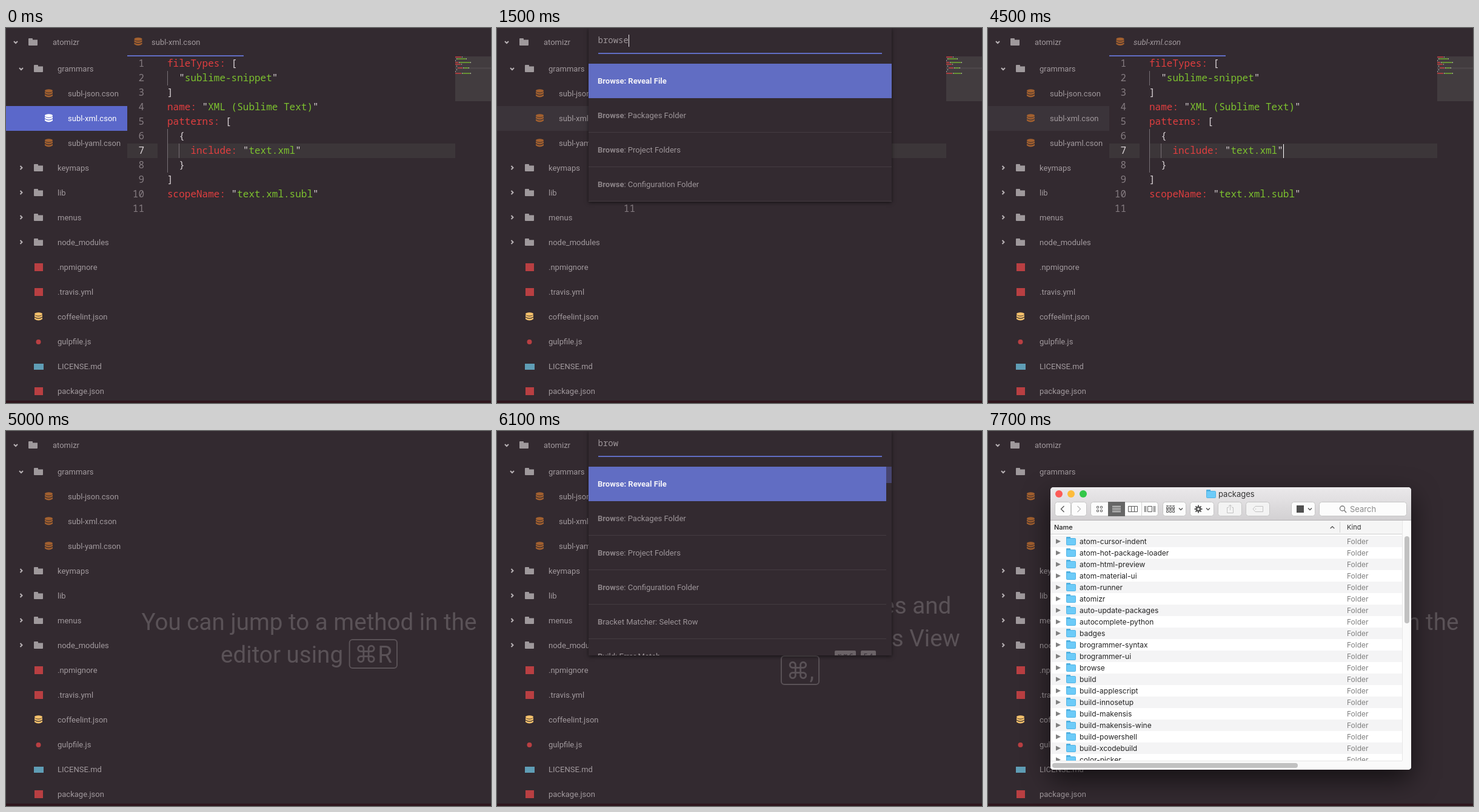
Recreate the animation shown at these times as an HTML page with a canvas. Size 800 by 620 pixels, loop 8 s.

```html
<!DOCTYPE html>
<html lang="en">
<head>
<meta charset="utf-8">
<title>Browse packages</title>
<style>
html, body { margin: 0; width: 100%; height: 100%; overflow: hidden; background: #332a30; }
canvas { display: block; }
</style>
</head>
<body>
<canvas id="stage" width="800" height="620"></canvas>
<script>
const ctx = document.getElementById('stage').getContext('2d');
const LOOP = 8000;
const UI = 'Roboto, "DejaVu Sans", sans-serif';
const MONO = '"Noto Sans Mono", "DejaVu Sans Mono", "DejaVu Sans", monospace';
const MAC = 'Inter, "Liberation Sans", sans-serif';
const C = {
  bg: '#332a30', text: '#a1999d', blue: '#616dc3', line: '#3c3639', red: '#e03e3f',
  green: '#7cc12f', pale: '#d9d2d5', logo: '#b93f42', brown: '#a2602f', tip: '#5a5257'
};

const tree = [
  ['grammars', 'open'], ['subl-json.cson', 'db'], ['subl-xml.cson', 'db'], ['subl-yaml.cson', 'db'],
  ['keymaps', 'dir'], ['lib', 'dir'], ['menus', 'dir'], ['node_modules', 'dir'],
  ['.npmignore', 'logo'], ['.travis.yml', 'logo'], ['coffeelint.json', 'json'],
  ['gulpfile.js', 'dot'], ['LICENSE.md', 'md'], ['package.json', 'logo']
];
const code = [
  'fileTypes: [', '  "sublime-snippet"', ']', 'name: "XML (Sublime Text)"', 'patterns: [', '  {',
  '    include: "text.xml"', '  }', ']', 'scopeName: "text.xml.subl"', ''
];
const build = [
  ['Build: Stop'], ['Build: Trigger', '⌥⌘B', 'F9'], ['Build: Confirm'], ['Build: No Confirm'],
  ['Build: Error Match', '⌥⌘G', 'F4'], ['Build: Toggle Panel', '⌥⌘V', 'F8']
];
const browse = ['Reveal File', 'Packages Folder', 'Project Folders', 'Configuration Folder'].map(s => ['Browse: ' + s]);
const mixed = [...browse, ['Bracket Matcher: Select Row'], ['Build: Error Match', '⌥⌘G', 'F4']];

// start, typed text, rows, cursor shown, selected row
const palette = [
  [500, 'b', build, 0, 0], [700, 'br', mixed, 0, 0], [900, 'bro', mixed, 1, 0],
  [1100, 'brow', mixed, 1, 0], [1300, 'brows', mixed.slice(0, 5), 1, 0], [1500, 'browse', browse, 1, 0],
  [2500], [5500, 'b', build, 0, 0], [5700, 'br', mixed, 1, 0], [5900, 'bro', mixed, 1, 0],
  [6100, 'brow', mixed, 0, 0], [6300, 'brows', browse, 0, 0], [6500, 'browse', browse, 0, 0],
  [6700, 'browse', browse, 0, 1], [7700]
];
const files = [
  ['subl-json.cson', '318 bytes', '17 April 2016 at 20:12'],
  ['subl-xml.cson', '135 bytes', 'Today at 21:48'],
  ['subl-yaml.cson', '140 bytes', '17 April 2016 at 20:12']
];
const packages = ('atom-cursor-indent atom-hot-package-loader atom-html-preview atom-material-ui atom-runner ' +
  'atomizr auto-update-packages autocomplete-python badges brogrammer-syntax brogrammer-ui browse build ' +
  'build-applescript build-innosetup build-makensis build-makensis-wine build-powershell build-xcodebuild ' +
  'color-picker').split(' ');

function rect(x, y, w, h, color) {
  ctx.fillStyle = color;
  ctx.fillRect(x, y, w, h);
}

function round(x, y, w, h, r, fill, stroke, width = 1) {
  ctx.beginPath();
  ctx.roundRect(x, y, w, h, r);
  if (fill) { ctx.fillStyle = fill; ctx.fill(); }
  if (stroke) { ctx.strokeStyle = stroke; ctx.lineWidth = width; ctx.stroke(); }
}

function disc(x, y, r, fill, stroke) {
  ctx.beginPath();
  ctx.arc(x, y, r, 0, 7);
  if (fill) { ctx.fillStyle = fill; ctx.fill(); }
  if (stroke) { ctx.strokeStyle = stroke; ctx.lineWidth = 1.3; ctx.stroke(); }
}

function lines(points, color, width = 1, fill) {
  ctx.beginPath();
  points.forEach(([x, y], i) => i ? ctx.lineTo(x, y) : ctx.moveTo(x, y));
  if (fill) { ctx.fillStyle = color; ctx.fill(); return; }
  ctx.strokeStyle = color;
  ctx.lineWidth = width;
  ctx.stroke();
}

// Writes text and returns its width.
function text(str, x, base, font, color, align = 'left') {
  ctx.font = font;
  ctx.fillStyle = color;
  ctx.textAlign = align;
  ctx.fillText(str, x, base);
  return ctx.measureText(str).width;
}

function shadow(color, blur, dy, draw) {
  ctx.save();
  ctx.shadowColor = color;
  ctx.shadowBlur = blur;
  ctx.shadowOffsetY = dy;
  draw();
  ctx.restore();
}

function chevron(x, y, dir, color, size = 3, width = 2) {
  const side = dir === 'left' || dir === 'right', sign = dir === 'right' || dir === 'down' ? 1 : -1;
  const p = [[-size, -size * sign / 2], [0, size * sign / 2], [size, -size * sign / 2]];
  lines(p.map(([a, b]) => side ? [x + b, y + a] : [x + a, y + b]), color, width);
}

function folder(x, y) {
  round(x, y - 6, 7, 4, 1, '#9f999c');
  round(x, y - 4, 15, 10, 1, '#9f999c');
  rect(x + 7, y - 4, 8, 1, '#6f686c');
}

function database(x, y, color) {
  ctx.fillStyle = color;
  ctx.beginPath();
  ctx.ellipse(x, y - 4.5, 6.5, 2.7, 0, 0, 7);
  ctx.fill();
  for (const top of [-3, 1]) {
    ctx.beginPath();
    ctx.moveTo(x - 6.5, y + top);
    ctx.quadraticCurveTo(x, y + top + 4.4, x + 6.5, y + top);
    ctx.lineTo(x + 6.5, y + top + 2.8);
    ctx.quadraticCurveTo(x, y + top + 7.2, x - 6.5, y + top + 2.8);
    ctx.fill();
  }
}

function drawTree(selection) {
  const font = '13px ' + UI;
  if (selection) rect(0, 129, 200, 41, selection);
  chevron(16, 23.5, 'down', '#b8b2b5');
  folder(37, 23);
  text('atomizr', 77, 28, font, C.text);
  tree.forEach(([name, kind], i) => {
    const y = 67.5 + 41 * i, child = kind === 'db', active = i === 2 && selection === '#5b68ca';
    if (kind === 'open') chevron(25, y, 'down', '#b8b2b5');
    if (kind === 'dir') chevron(25, y - .5, 'right', '#b8b2b5');
    if (kind === 'open' || kind === 'dir') folder(46, y - .5);
    if (child) database(70.5, y, active ? '#fff' : C.brown);
    if (kind === 'json') database(53.5, y, '#f5c26c');
    if (kind === 'logo') rect(47, y - 6.5, 14, 13, C.logo);
    if (kind === 'dot') disc(53.5, y + .5, 4, C.logo);
    if (kind === 'md') rect(46, y - 4.5, 16, 10, '#5f9db5');
    text(name, child ? 102 : 85, Math.floor(y + 5), font, active ? '#fff' : C.text);
  });
}

function tokens(line) {
  const out = [];
  for (const m of line.matchAll(/(\w+:)|"([^"]*)"|\S/g)) {
    if (m[2] === undefined) out.push([m.index, m[0], m[1] ? C.red : C.pale]);
    else out.push([m.index, '"', C.pale], [m.index + 1, m[2], C.green], [m.index + 1 + m[2].length, '"', C.pale]);
  }
  return out;
}

function drawEditor(italic, cursor) {
  const font = '500 16px ' + MONO;
  database(218, 23, C.brown);
  text('subl-xml.cson', 240, 28, (italic ? 'italic ' : '') + '13px ' + UI, C.text);
  rect(200, 45, 192, 2, C.blue);
  rect(200, 191, 50, 24, C.line);
  rect(266, 191, 475, 24, C.line);
  rect(741, 47, 59, 74, '#423c3f');
  rect(741, 65, 59, 3, '#4b4548');
  for (const [x, y, h] of [[266, 71, 24], [266, 167, 72], [285, 191, 24]]) rect(x, y, 1, h, '#777075');
  code.forEach((line, i) => {
    const base = 64 + 24 * i;
    text(i + 1, 228, base, font, i === 6 ? C.pale : '#857c81', 'right');
    for (const [col, str, color] of tokens(line)) {
      text(str, 266 + col * 9.6, base, font, color);
      ctx.globalAlpha = .65;
      rect(741 + col, 47 + 3 * i, str.length, 2, color);
      ctx.globalAlpha = 1;
    }
  });
  if (cursor) rect(487, 192, 1, 23, '#fff');
}

function drawTip(rows, keys, inline) {
  const font = '38.6px ' + UI;
  const first = inline ? 329 : 302;
  rows.forEach((row, i) => {
    if (!(inline && i === rows.length - 1)) text(row, 500, first + 54 * i, font, C.tip, 'center');
  });
  ctx.font = font;
  const cap = ctx.measureText(keys).width + 18;
  const last = inline ? rows[rows.length - 1] + ' ' : '';
  const lead = ctx.measureText(last).width;
  const left = 500 - (lead + cap) / 2;
  const base = first + 54 * (inline ? rows.length - 1 : rows.length);
  text(last, left, base, font, C.tip);
  text(keys, left + lead + 9, base, font, C.tip);
  round(left + lead + 1, base - 38, cap - 2, 47, 5, null, C.tip, 2);
}

function keycap(str, right, y) {
  const w = str.length === 3 ? 35 : 25;
  round(right - w, y - 9, w, 18, 2, '#6b6367');
  [...str].forEach((ch, i) => text(ch, right - w + 8 + i * (w === 35 ? 9.7 : 9), y + 4, '11px ' + MONO, '#302830', 'center'));
  return right - w - 8;
}

function drawPalette(typed, rows, cursor, selected) {
  const bottom = Math.min(371, 59 + 57 * rows.length);
  const long = rows.length > 5, width = long ? 491 : 500;
  shadow('rgba(0,0,0,.55)', 6, 2, () => rect(151, 0, 500, bottom, C.bg));
  const end = 167 + text(typed, 166.5, 25, '14px ' + MONO, '#9d9599');
  if (cursor) rect(Math.round(end), 11, 1, 20, '#e8e4e6');
  rect(167, 41, 468, 2, C.blue);
  ctx.save();
  ctx.beginPath();
  ctx.rect(151, 59, 500, bottom - 59);
  ctx.clip();
  rows.forEach(([label, ...keys], i) => {
    const y = 59 + 57 * i, bold = '600 13px ' + UI;
    rect(151, y + 56, width, 1, '#443c41');
    if (i === selected) {
      rect(151, y, width, 57, C.blue);
      text(label, 166, y + 33, bold, '#f4f3f8');
    } else {
      const hit = label.toLowerCase().startsWith(typed) ? typed.length : 1;
      const w = text(label.slice(0, hit), 166, y + 33, bold, '#8c8488');
      text(label.slice(hit), 166 + w, y + 33, '13px ' + UI, '#9d9599');
    }
    let right = 625;
    for (const key of keys.reverse()) right = keycap(key, right, y + 86 - 0 - 0 - 0 > 0 ? y + 28 + .5 - 2 + 1.5 - .0 - 0 + -0 : y);
    keys.reverse();
  });
  if (long) rect(642, 59, 9, 27, '#474570');
  ctx.restore();
}

function button(x, w, fill = '#fcfcfc') {
  round(x + .5, 117.5, w - 1, 23, 4, fill, '#c6c6c6');
}

function drawToolbar(dim) {
  const ink = '#5a5a5a', soft = dim ? '#c2c2c2' : '#6a6a6a';
  ['#fc5b57', '#fdbc3c', '#33c748'].forEach((color, i) => disc(117 + 20 * i, 104, 6, color));
  button(110, 27); button(137, 26);
  chevron(123, 129, 'left', ink, 5, 1.4);
  chevron(150, 129, 'right', '#bdbdbd', 5, 1.4);
  button(169, 112);
  rect(198, 117, 28, 24, '#666');
  rect(253, 118, 1, 22, '#d4d4d4');
  for (const x of [179, 185]) for (const y of [124, 130]) round(x + .5, y + .5, 3, 3, .5, null, ink);
  for (let y = 124; y < 135; y += 3) rect(205, y, 14, 1, '#fff');
  for (const x of [231, 236, 241]) round(x + .5, 124.5, 5, 9, 0, null, ink);
  round(263.5, 124.5, 7, 9, 0, null, ink);
  for (const x of [258, 260, 273, 275]) rect(x, 124, 1, 10, ink);
  button(288, 39);
  for (const x of [294, 299, 304]) for (const y of [124, 130]) {
    rect(x, y - 1, 4, 1, ink);
    round(x + .5, y + 1.5, 3, 3, 0, null, ink);
  }
  chevron(318, 129, 'down', ink, 3, 1.5);
  button(333, 40);
  for (let a = 0; a < 8; a++) {
    const dx = Math.cos(a * Math.PI / 4), dy = Math.sin(a * Math.PI / 4);
    lines([[347 + 3 * dx, 129 + 3 * dy], [347 + 6.5 * dx, 129 + 6.5 * dy]], ink, 2);
  }
  disc(347, 129, 4.6, ink);
  disc(347, 129, 1.8, '#fcfcfc');
  chevron(363, 129, 'down', ink, 3, 1.5);
  button(379, 40, dim ? '#f3f3f3' : '#fcfcfc');
  lines([[397, 126.5], [394.5, 126.5], [394.5, 135.5], [404.5, 135.5], [404.5, 126.5], [402, 126.5]], soft);
  lines([[399.5, 131], [399.5, 122]], soft);
  lines([[396.5, 125], [399.5, 122], [402.5, 125]], soft);
  button(425, 40, dim ? '#f3f3f3' : '#fcfcfc');
  lines([[437, 129], [441, 124.5], [453.5, 124.5], [453.5, 133.5], [441, 133.5], [437, 129]], soft);
  disc(441.5, 129, .8, soft);
  button(500, 40);
  rect(509, 123, 12, 12, '#505050');
  chevron(531, 129, 'down', ink, 3, 1.5);
  button(546, 145);
  disc(584.5, 128, 4, null, '#777');
  lines([[587.5, 131], [591, 135]], '#777', 1.4);
  text('Search', 597, 134, '13px ' + MAC, '#8b8b8b');
}

function macFolder(x, y, w, h) {
  round(x, y, w * .45, 5, 1, '#4eaede');
  round(x + .5, y + 2.5, w - 1, h - 3, 1, '#6dcbf8', '#53b4e4');
}

function drawFinder(isPackages) {
  shadow('rgba(0,0,0,.6)', 44, 16, () => round(103, 93, 595, 467, 5, '#fff'));
  ctx.save();
  ctx.beginPath();
  ctx.roundRect(103, 93, 595, 467, 5);
  ctx.clip();
  const bar = ctx.createLinearGradient(0, 93, 0, 148);
  bar.addColorStop(0, '#ebe9eb');
  bar.addColorStop(1, '#d2d0d2');
  rect(103, 93, 595, 55, bar);
  rect(103, 147, 595, 1, '#b4b2b4');
  drawToolbar(isPackages);
  macFolder(isPackages ? 360 : 359, 97, 16, 14);
  text(isPackages ? 'packages' : 'grammars', isPackages ? 380 : 379, 109, '13px ' + MAC, '#333');

  const right = isPackages ? 683 : 698, font = '12px ' + MAC, head = '500 11px ' + MAC;
  rect(103, 148, right - 103, 23, '#f5f5f5');
  rect(103, 170, right - 103, 1, '#d0d0d0');
  text('Name', 109, 163, head, '#222');
  chevron(isPackages ? 568 : 435, 159.5, 'up', '#444', 3.3, 1.3);
  for (const x of isPackages ? [580] : [447, 557]) rect(x, 150, 1, 18, '#d2d2d2');
  if (isPackages) text('Kind', 592, 163, '11px ' + MAC, '#333');
  else {
    text('Size', 544, 163, '11px ' + MAC, '#333', 'right');
    text('Date Modified', 569, 163, '11px ' + MAC, '#333');
  }
  for (let i = 0; i < 20; i++) {
    const y = 173 + 19 * i, base = y + 14;
    if (i % 2 === 0) rect(103, y, right - 103, 19, '#f4f4f5');
    if (isPackages) {
      lines([[112, y + 5.5], [120, y + 9.5], [112, y + 13.5]], '#818181', 1, true);
      macFolder(129, y + 2, 16, 14);
      text(packages[i], 151, base, font, '#222');
      text('Folder', 592, base, font, '#808080');
    } else if (files[i]) {
      const [name, size, date] = files[i], on = i === 1;
      if (on) rect(103, y, 595, 19, '#fe3a31');
      const f = (on ? '500 ' : '') + font, grey = on ? '#fff' : '#808080';
      const page = [[132.5, y + 2.5], [139, y + 2.5], [142.5, y + 6], [142.5, y + 16.5], [132.5, y + 16.5], [132.5, y + 2.5]];
      lines(page, '#fff', 1, true);
      if (!on) lines(page, '#b9b9b9');
      lines([[138.5, y + 3], [138.5, y + 6.5], [142, y + 6.5]], on ? '#e8a8a4' : '#b9b9b9');
      text(name, 151, base, f, on ? '#fff' : '#222');
      text(size, 544, base, f, grey, 'right');
      text(date, 569, base, f, grey);
    }
  }
  rect(103, 545, 595, 15, '#fafafa');
  rect(103, 545, 595, 1, '#e6e6e6');
  round(106, 549, isPackages ? 405 : 456, 8, 4, '#c1c1c1');
  if (isPackages) {
    rect(683, 148, 15, 412, '#fafafa');
    rect(683, 148, 1, 397, '#e6e6e6');
    round(687, 174, 8, 144, 4, '#c1c1c1');
  }
  ctx.restore();
}

function draw(t) {
  rect(0, 0, 800, 620, C.bg);
  drawTree(t < 500 ? '#5b68ca' : t < 5000 ? '#3b343a' : null);
  if (t < 5000) drawEditor(t >= 2500, t >= 4500);
  else if (t >= 5900 && t < 7700) drawTip(['You can install packages and', 'themes from the Settings View'], '⌘,', false);
  else drawTip(['You can jump to a method in the', 'editor using'], '⌘R', true);
  rect(0, 616, 800, 4, '#2f171e');
  const step = palette.findLast(p => t >= p[0]);
  if (step && step[1]) drawPalette(...step.slice(1));
  if (t >= 2500 && t < 4500) drawFinder(false);
  if (t >= 7700) drawFinder(true);
}

function tick() {
  draw(performance.now() % LOOP);
  requestAnimationFrame(tick);
}
tick();
</script>
</body>
</html>
```
